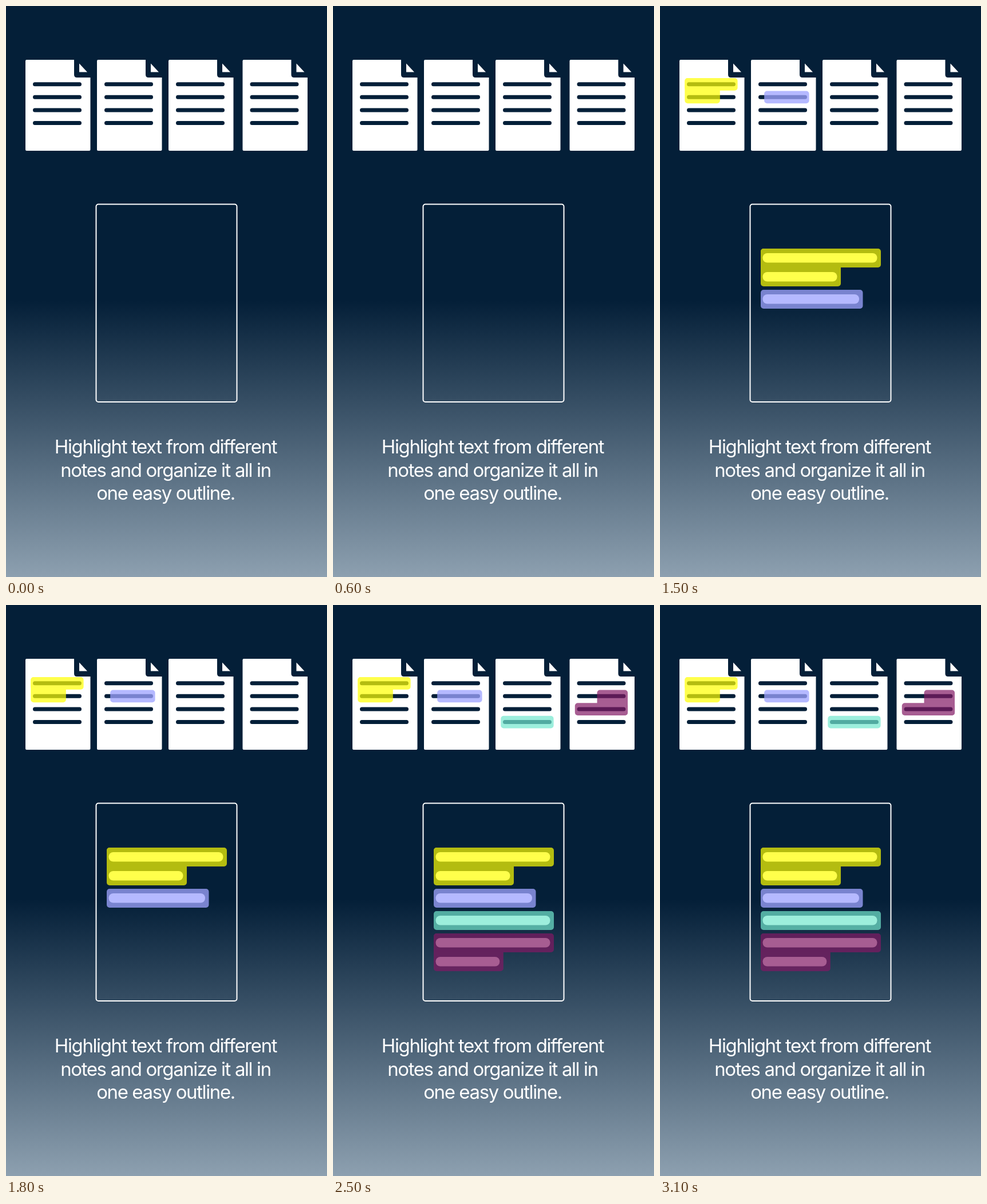
Animation of 561x998 px, one loop 3500 ms. Source, as an HTML page:

```html
<!DOCTYPE html>
<html lang="en">
<head>
<meta charset="utf-8">
<title>Highlights to outline</title>
<style>
  html, body { margin: 0; width: 100%; height: 100%; overflow: hidden; background: #041f38; }
  svg { display: block; width: 100%; height: 100%; }
  text {
    font: 400 33px Inter, sans-serif;
    font-optical-sizing: none;
    letter-spacing: -1.4px;
    text-anchor: middle;
    fill: #fff;
  }
</style>
</head>
<body>
<svg viewBox="0 0 561 998">
  <defs>
    <linearGradient id="sky" x1="0" y1="0" x2="0" y2="1">
      <stop offset=".516" stop-color="#041f38"/>
      <stop offset="1" stop-color="#8da0b0"/>
    </linearGradient>
    <g id="note">
      <path fill="#fff" d="M2 0H85V26Q85 31 90 31H113.5V157Q113.5 159 111.5 159H2Q0 159 0 157V2Q0 0 2 0Z
        M94 6.5V21.5H108Z"/>
      <path stroke="#041f38" stroke-width="7" stroke-linecap="round"
        d="M16.5 42.7h78m-78 22.6h78m-78 22.6h78m-78 22.6h78"/>
    </g>
  </defs>
  <rect width="561" height="998" fill="url(#sky)"/>
  <g id="notes"></g>
  <rect x="157.5" y="346.5" width="246" height="345.5" rx="4" fill="none" stroke="#fff" stroke-width="2"/>
  <g id="marks"></g>
  <text x="279" y="782.4">Highlight text from different</text>
  <text x="279" y="822.9">notes and organize it all in</text>
  <text x="279" y="863.4">one easy outline.</text>
</svg>
<script>
const LOOP = 3500, FIRST_MARK = 1000, MARK_INTERVAL = 500;
const NOTE_TOP = 94;
const noteLefts = [34, 159, 284, 413.5];

// Marked lines of each note: first row, and lengths as shares of a full line.
const highlights = [
  { color: "#ff0", opacity: 0.7, row: 0, lengths: [1, 2 / 3] },
  { color: "#9ea3ff", opacity: 0.76, row: 1, lengths: [0.85], alignRight: true },
  { color: "#72e7cd", opacity: 0.7, row: 3, lengths: [1] },
  { color: "#821964", opacity: 0.7, row: 2 - 1, lengths: [0.58, 1], alignRight: true },
];

const noteLine = { width: 92.3, pitch: 22.6, height: 21.7 };
const outlineLine = { width: 210, pitch: 33, height: 33 };
const OUTLINE_LEFT = 176, OUTLINE_GAP = 6;

const rect = (x, y, width, height, radius) =>
  `<rect x="${x}" y="${y}" width="${width}" height="${height}" rx="${radius}"/>`;

// A short line spans the whole block so that it joins the full line beside it.
function block(left, top, lengths, line, alignRight) {
  const blockHeight = (lengths.length - 1) * line.pitch + line.height;
  return lengths.map((length, i) => {
    const x = left + (alignRight ? line.width * (1 - length) : 0);
    const isFull = length === 1;
    return rect(x, isFull ? top + i * line.pitch : top,
      line.width * length, isFull ? line.height : blockHeight, 5);
  }).join("");
}

let outlineTop = 424;
function highlightMarkup({ color, opacity, row, lengths, alignRight }, i) {
  const outlined = [...lengths].sort((a, b) => b - a);
  const top = outlineTop;
  outlineTop += lengths.length * outlineLine.pitch + OUTLINE_GAP;

  const bars = outlined.map((length, j) =>
    rect(OUTLINE_LEFT + 3.5, top + 8 + j * outlineLine.pitch, outlineLine.width * length - 10, 16.5, 8));
  const noteBlock = block(noteLefts[i] + 9.3, NOTE_TOP + 32 + row * noteLine.pitch, lengths, noteLine, alignRight);
  const outlineBlock = block(OUTLINE_LEFT, top, outlined, outlineLine);
  return `<g>
    <g fill="#fff">${bars.join("")}</g>
    <g fill="${color}" opacity="${opacity}">${noteBlock}${outlineBlock}</g>
  </g>`;
}

const marks = document.getElementById("marks");
marks.innerHTML = highlights.map(highlightMarkup).join("");
document.getElementById("notes").innerHTML =
  noteLefts.map(x => `<use href="#note" x="${x}" y="${NOTE_TOP}"/>`).join("");

function draw() {
  const time = performance.now() % LOOP;
  [...marks.children].forEach((mark, i) => {
    mark.style.display = time >= FIRST_MARK + i * MARK_INTERVAL ? "" : "none";
  });
  requestAnimationFrame(draw);
}
draw();
</script>
</body>
</html>
```
